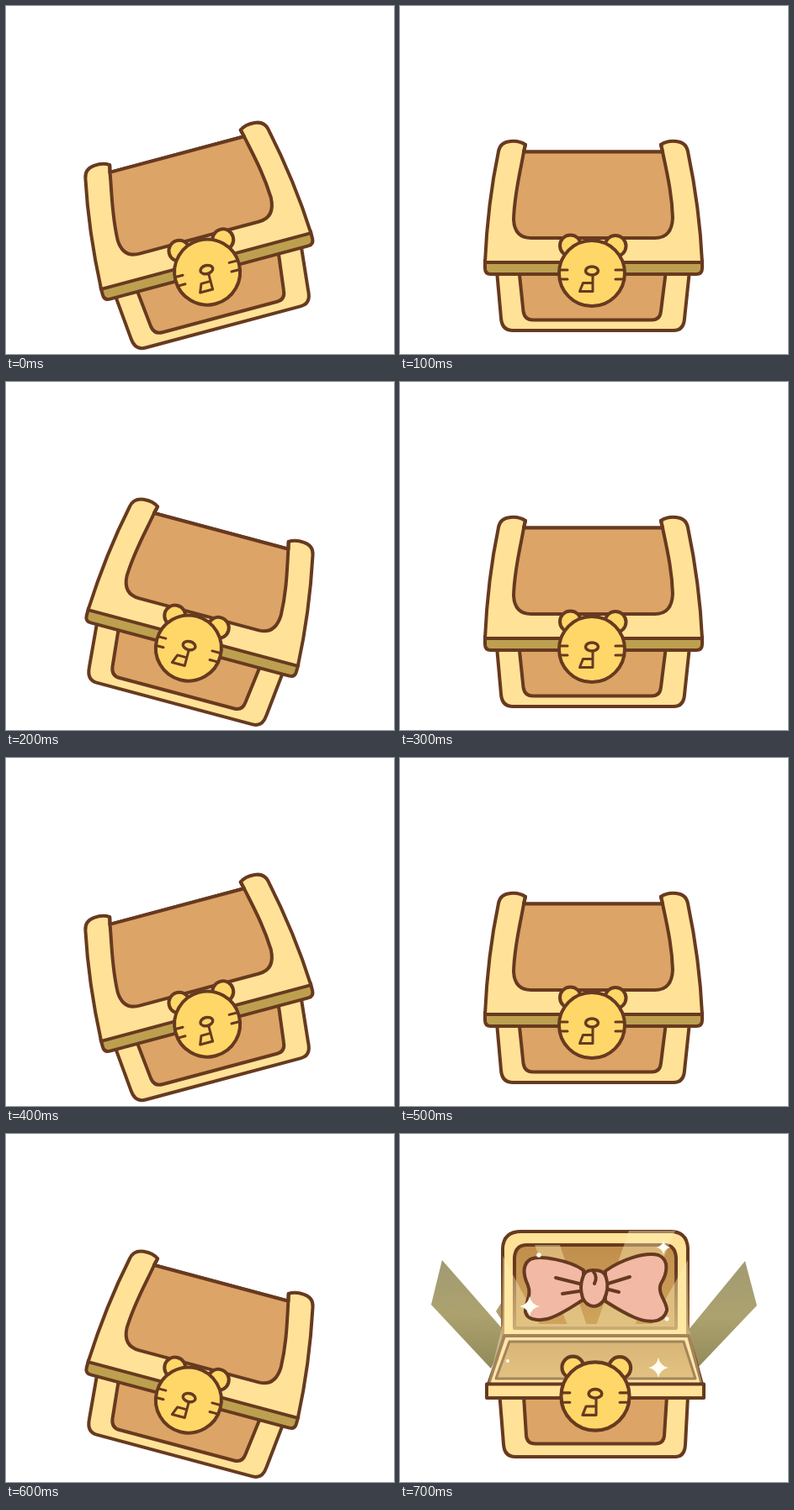
These frames come from a looping animation (461x414 px, 0.8 s). An HTML page:

```html
<!DOCTYPE html>
<html lang="en">
<head>
<meta charset="utf-8">
<title>Treasure chest</title>
<style>
  html, body { margin: 0; width: 100%; height: 100%; overflow: hidden; background: #fff; }
  svg { display: block; width: 100%; height: 100%; }
  .ink { stroke: #673a20; stroke-width: 4; stroke-linejoin: round; stroke-linecap: round; }
  .cream { fill: #ffe297; }
  .wood { fill: #dca466; }
  .gold { fill: #ffd768; }
  .line { fill: none; }
</style>
</head>
<body>
<svg viewBox="0 0 461 414">
  <defs>
    <linearGradient id="beam" x1="0" y1="0" x2="0" y2="1">
      <stop offset="0" stop-color="#a29a72"/>
      <stop offset=".5" stop-color="#aca26f"/>
      <stop offset="1" stop-color="#918959"/>
    </linearGradient>
    <linearGradient id="inside" x1="0" y1="0" x2="0" y2="1">
      <stop offset="0" stop-color="#c18e4c"/>
      <stop offset="1" stop-color="#cfa55e"/>
    </linearGradient>
    <linearGradient id="fade" x1="0" y1="0" x2="0" y2="1">
      <stop offset=".3" stop-color="#673a20"/>
      <stop offset="1" stop-color="#a97f48"/>
    </linearGradient>
    <!-- bear lock, centred on its face -->
    <g id="lock" class="ink">
      <circle class="gold" cx="-25.500" cy="-33" r="12.500"/>
      <circle class="gold" cx="28" cy="-32.500" r="12.500"/>
      <circle class="gold" r="39"/>
      <path class="line" stroke-width="3" d="M-37-4h8M-37 7h8M28-4h10M28 7h10M1 2V21.500H-14.500L-10.500 11.500H1"/>
      <ellipse class="gold" stroke-width="3.500" cy="-3" rx="7.500" ry="5"/>
    </g>
    <path id="star" fill="#fffdf2" d="M0-12Q2-2 12 0Q2 2 0 12Q-2 2-12 0Q-2-2 0-12Z"/>
  </defs>

  <g id="closed">
    <g class="ink">
      <path class="cream" d="M115 315L120 371Q121 386 134 386H325Q337 386 338 372L344 315Z"/>
      <path class="wood" d="M141.500 315L146.500 363Q148 373.500 158 373.500H299Q309 373.500 310 363L316 315Z"/>
      <path fill="#bda04f" d="M101 303H359V312Q359 319 352 319H108Q101 319 101 312Z"/>
      <path class="cream" d="M149 165Q142 160 131 161Q119 162 117 173C108 216 103 260 101 305H359C357 260 351 216 342 173Q340 162 328 161Q317 160 310 165L312 173.500H147Z"/>
      <path class="wood" d="M147 173.500H312C317 198 323 222 324 252Q323 276 303 276H156Q136 276 135 254C136 222 143 198 147 173.500Z"/>
      <path class="line" d="M149 165L147 173.500M310 165L312 173.500"/>
    </g>
    <use href="#lock" x="228" y="318"/>
  </g>

  <g id="open">
    <g fill="url(#beam)">
      <path d="M50 150L37 203L108 279L128 239Z"/>
      <path d="M410 151L424 204L350 282L337 240Z"/>
      <path d="M122 198L114 211L124 226Z"/>
    </g>
    <g class="ink">
      <g stroke="url(#fade)">
        <path class="cream" d="M122 241V136Q123 116 144 116H321Q341 116 342 136V241Z"/>
        <path fill="url(#inside)" d="M136 231V147Q137 132 151 132H314Q327 132 328 147V231Z"/>
      </g>
      <path class="cream" d="M124 240H343L359 298H105Z"/>
      <path fill="url(#inside)" stroke-width="3" d="M130 247H337L351 291H114Z"/>
    </g>
    <g fill="#fff0b8" opacity=".4">
      <path d="M200 290L122 145V236L165 290Z"/>
      <path d="M225 290L160 132H190L236 270Z"/>
      <path d="M222 260L272 115H327L252 290Z"/>
      <path d="M262 290L342 150V236L290 290Z"/>
      <path d="M122 226H342L359 296H105Z"/>
      <path d="M136 247H152L174 290H162Z"/>
      <path d="M298 247H318L288 290H275Z"/>
    </g>
    <g class="ink" fill="#f2b9a5">
      <path d="M218 162C201 150 166 144 155 149C144 156 147 169 152 180C157 192 148 202 149 212C152 224 172 222 181 218C196 212 208 203 218 197Z"/>
      <path d="M244 163C262 150 290 140 307 144C321 150 317 167 310 178C305 190 318 200 317 210C312 227 292 224 278 218C264 212 252 204 244 199Z"/>
      <path d="M217 171Q219 161 231 162Q243 162 245 171Q249 184 242 198Q237 205 230 205Q221 204 217 195Q213 182 217 171Z"/>
      <path class="line" d="M185 171L213 178M193 190L213 187M247 178L273 170M248 185L260 188M230 164Q235 170 231 178"/>
    </g>
    <g class="ink">
      <path class="cream" d="M118.500 312L123 369Q124 384 137 384H327Q338 384 339 370L342 312Z"/>
      <path class="wood" d="M147 312L150 359Q151 368.500 161 368.500H303Q313 368.500 314 359L317 312Z"/>
      <path class="cream" d="M103 297.500H361V314H103Z"/>
    </g>
    <use href="#lock" transform="translate(232 312) scale(1.04)"/>
    <use href="#star" x="154" y="205"/>
    <use href="#star" x="307" y="278"/>
    <use href="#star" transform="translate(313 135) scale(.7)"/>
    <g fill="#fffdf2">
      <circle cx="165" cy="144" r="2.800"/>
      <circle cx="317" cy="220" r="2.500"/>
      <circle cx="128" cy="270" r="2"/>
    </g>
  </g>
</svg>
<script>
  const closed = document.getElementById('closed');
  const open = document.getElementById('open');
  const tilts = [-15, 0, 15, 0];
  const show = (el, on) => { el.style.display = on ? '' : 'none'; };

  // The chest rocks in hard steps, then springs open on the last one.
  function draw() {
    const step = Math.floor(performance.now() % 800 / 100);
    show(open, step === 7);
    show(closed, step < 7);
    closed.setAttribute('transform', `rotate(${tilts[step % 4]} 228 275)`);
    requestAnimationFrame(draw);
  }
  draw();
</script>
</body>
</html>
```
